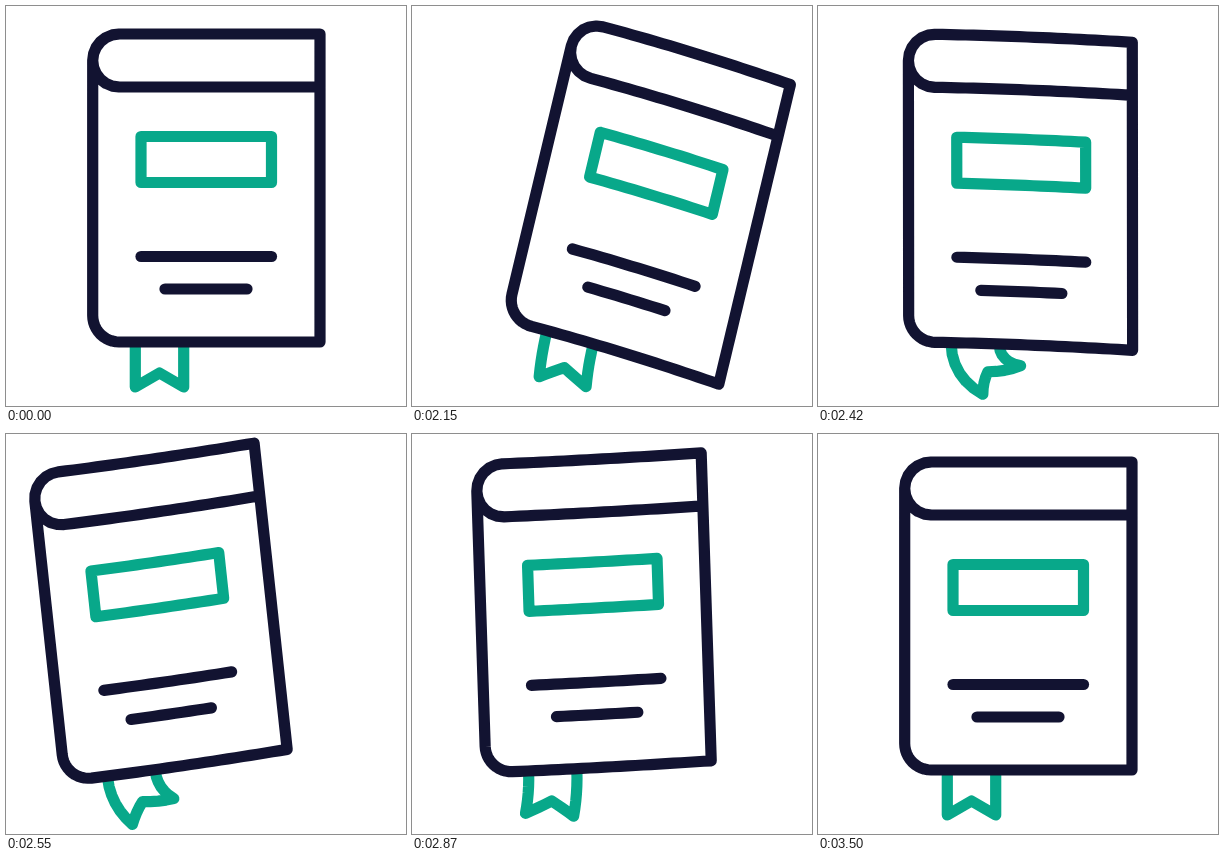
An HTML page with a canvas that plays this animation: 400 by 400 pixels, repeating every 3520 ms.

```html
<!DOCTYPE html>
<html lang="en">
<head>
<meta charset="utf-8">
<title>Swinging book</title>
<style>
  html, body { margin: 0; height: 100%; overflow: hidden; background: #fff; }
  canvas { display: block; width: 100vmin; height: 100vmin; }
</style>
</head>
<body>
<canvas id="stage" width="400" height="400"></canvas>
<script>
const ctx = document.getElementById('stage').getContext('2d');
const NAVY = '#121331', GREEN = '#08a88a';
const LOOP = 3520, START = 2020, END = 3500;
const RAD = Math.PI / 180;

// time, book angle, shift x, shift y, page bend, ribbon angle
const KEYS = [
  [2000, 0, 0, 0, 0, 0],
  [2020, 1.1, 0, 0, 0, -1.1],
  [2150, 13.4, 4, 4.2, 13, -4],
  [2200, 14.8, 5, 4.5, 13.5, -8],
  [2420, 0, 4, 0, 8.5, -38],
  [2520, -5.2, -23, -1, -4.5, -32],
  [2610, -7.2, -34, -1, -12, -2],
  [2720, -6, -29, -1, -13.5, 21],
  [3050, 2.8, 2, -1, 7, -13],
  [3080, 3, 2, -1, 6.5, -12],
  [3250, 1.3, 1, 0, 3, 6],
  [3500, 0, 0, 0, 0, 0]
];

const slope = (i, c) => (KEYS[i + 1][c] - KEYS[i][c]) / (KEYS[i + 1][0] - KEYS[i][0]);

// Flat at turning points, harmonic mean of neighbouring slopes elsewhere
function tangent(i, c) {
  if (i === 0 || i === KEYS.length - 1) return 0;
  const a = slope(i - 1, c), b = slope(i, c);
  return a * b > 0 ? 2 * a * b / (a + b) : 0;
}

function poseAt(time) {
  if (time < START || time >= END) return [0, 0, 0, 0, 0];
  const i = KEYS.findIndex(key => key[0] > time) - 1;
  const span = KEYS[i + 1][0] - KEYS[i][0];
  const s = (time - KEYS[i][0]) / span, r = 1 - s;
  return [1, 2, 3, 4, 5].map(c =>
    KEYS[i][c] * (1 + 2 * s) * r * r + KEYS[i + 1][c] * s * s * (3 - 2 * s) +
    span * s * r * (tangent(i, c) * r - tangent(i + 1, c) * s));
}

function rotate(x, y, cx, cy, degrees) {
  const cos = Math.cos(degrees * RAD), sin = Math.sin(degrees * RAD);
  x -= cx;
  y -= cy;
  return [cx + x * cos - y * sin, cy + x * sin + y * cos];
}

function arc(cx, cy, radius, from, to) {
  return Array.from({ length: 13 }, (_, i) => {
    const a = (from + (to - from) * i / 12) * RAD;
    return [cx + radius * Math.cos(a), cy + radius * Math.sin(a)];
  });
}

const COVER = [
  [314, 81], ...arc(113.2, 54.5, 26.5, 90, 270), [314, 28], [314, 336],
  ...arc(113.2, 309.5, 26.5, 90, 180), [86.7, 54.5]
];
const LABEL = [[135, 130.5], [265.5, 130.5], [265.5, 176.5], [135, 176.5], [135, 130.5]];
const RIBBON = [[129.3, 338], [129.3, 381], [153.5, 367], [177.7, 381], [177.7, 338]];

function stroke(points, color, warp, cap = 'round') {
  ctx.beginPath();
  ctx.moveTo(...warp(...points[0]));
  for (let i = 1; i < points.length; i++) {
    const [x0, y0] = points[i - 1], [x1, y1] = points[i];
    const steps = Math.ceil(Math.hypot(x1 - x0, y1 - y0) / 8);
    for (let k = 1; k <= steps; k++) {
      ctx.lineTo(...warp(x0 + (x1 - x0) * k / steps, y0 + (y1 - y0) * k / steps));
    }
  }
  ctx.strokeStyle = color;
  ctx.lineCap = cap;
  ctx.stroke();
}

function draw(time) {
  const [angle, dx, dy, bend, sway] = poseAt(time);
  const page = (x, y) => {
    const u = Math.max(0, (x - 87) / 227);
    const [px, py] = rotate(x - 0.4 * Math.abs(bend) * u ** 3, y + bend * u ** 1.6, 200, 336, angle);
    return [px + dx, py + dy];
  };
  const ribbon = (x, y) => page(...rotate(x, y, 153.5, 338, sway * (y - 338) / 43));

  ctx.fillStyle = '#fff';
  ctx.fillRect(0, 0, 400, 400);
  ctx.lineWidth = 11.2;
  ctx.lineJoin = 'round';
  stroke(RIBBON, GREEN, ribbon, 'butt');
  stroke(COVER, NAVY, page);
  stroke(LABEL, GREEN, page);
  stroke([[135, 250.5], [265.5, 250.5]], NAVY, page);
  stroke([[159, 283], [241, 283]], NAVY, page);
}

function tick() {
  draw(performance.now() % LOOP);
  requestAnimationFrame(tick);
}
tick();
</script>
</body>
</html>
```
